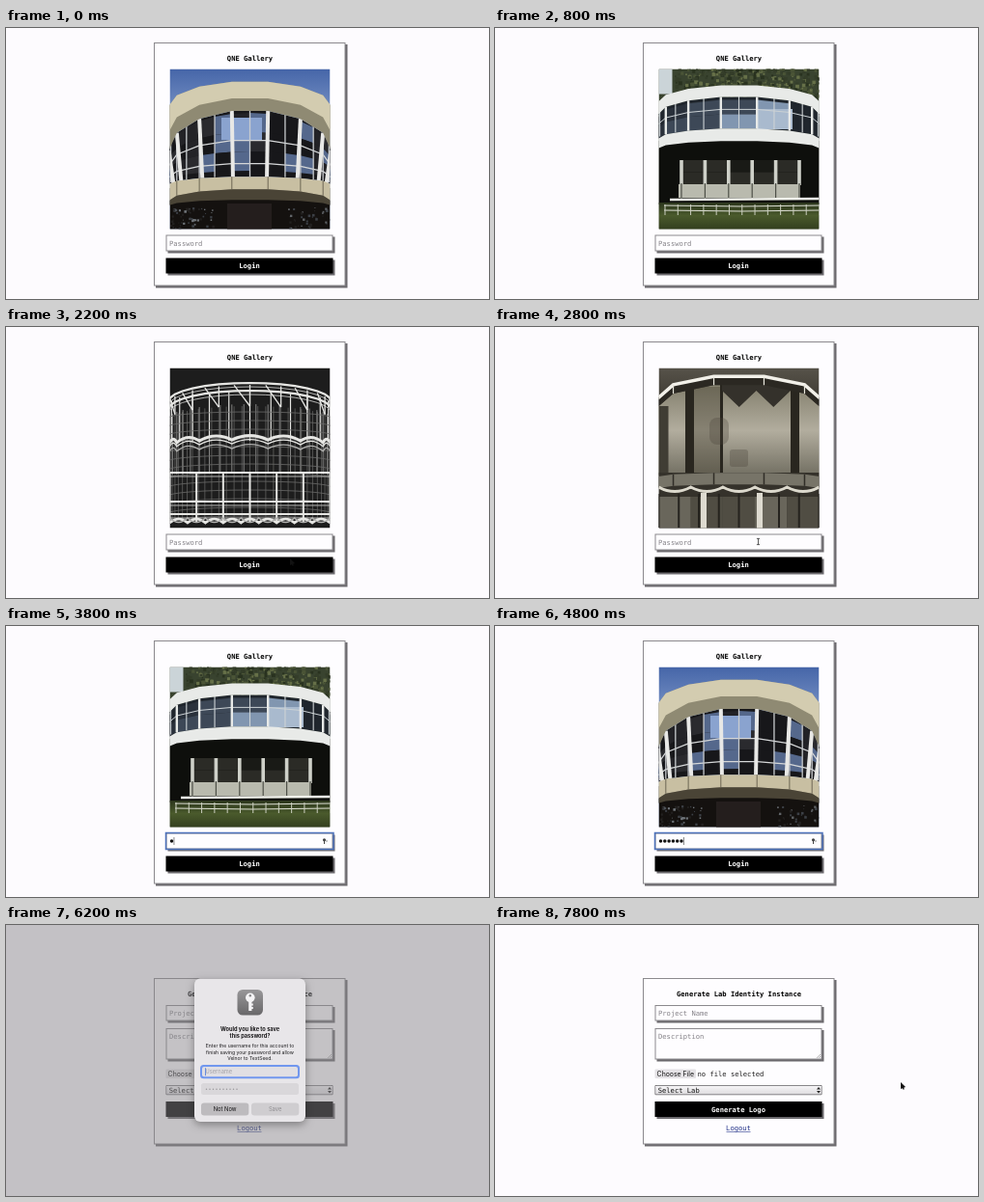
These frames come from a looping animation (500x281 px, 8000 ms). An HTML page with a canvas:

```html
<!DOCTYPE html>
<html lang="en">
<head>
<meta charset="utf-8">
<title>Login</title>
<style>
html, body { margin: 0; width: 100%; height: 100%; overflow: hidden; background: #fdfbfe; }
canvas { display: block; width: 500px; height: 281px; }
</style>
</head>
<body>
<canvas id="stage"></canvas>
<script>
const W = 500, H = 281, LOOP = 8000, TICK = 200;
const LEFT = 169.5, TOP = 42.5, SIZE = 166, CX = LEFT + SIZE / 2;
const MONO = '"DejaVu Sans Mono", monospace';
const SANS = 'Inter, sans-serif';
const canvas = document.getElementById('stage');
const ctx = canvas.getContext('2d');
const ratio = window.devicePixelRatio || 1;
canvas.width = W * ratio;
canvas.height = H * ratio;

const clamp = v => Math.max(0, Math.min(1, v));
const ease = v => v * v * (3 - 2 * v);
const span = (t, from, to) => ease(clamp((t - from) / (to - from)));
const mix = (a, b, k) => a + (b - a) * k;
const between = (p, q, k) => [mix(p[0], q[0], k), mix(p[1], q[1], k)];

function rect(x, y, w, h, color) {
  ctx.fillStyle = color;
  ctx.fillRect(x, y, w, h);
}
function round(x, y, w, h, r, color) {
  ctx.beginPath();
  ctx.roundRect(x, y, w, h, r);
  ctx.fillStyle = color;
  ctx.fill();
}
function dot(x, y, r, color) {
  ctx.beginPath();
  ctx.arc(x, y, r, 0, Math.PI * 2);
  ctx.fillStyle = color;
  ctx.fill();
}
function poly(pts, color) {
  ctx.beginPath();
  pts.forEach(p => ctx.lineTo(...p));
  ctx.fillStyle = color;
  ctx.fill();
}
function stroke(pts, color, width = 1) {
  ctx.beginPath();
  pts.forEach(p => ctx.lineTo(...p));
  ctx.strokeStyle = color;
  ctx.lineWidth = width;
  ctx.stroke();
}
function fade(y0, y1, ...colors) {
  const g = ctx.createLinearGradient(0, y0, 0, y1);
  colors.forEach((c, i) => g.addColorStop(i / (colors.length - 1), c));
  return g;
}
function text(str, x, y, font, color, align = 'left') {
  ctx.font = font;
  ctx.fillStyle = color;
  ctx.textAlign = align;
  ctx.fillText(str, x, y);
}
function seeded(seed) {
  return () => (seed = (seed * 16807) % 2147483647) / 2147483647;
}

// Rims of a round, faceted building: corners at equal angles, seen from below
function rim(y, sag, n, radius = SIZE / 2 + 1) {
  return Array.from({ length: n + 1 }, (_, i) => {
    const a = (i / n - 0.5) * Math.PI;
    return [CX + radius * Math.sin(a), y + sag * (1 - Math.cos(a))];
  });
}
// Straight or zigzag row of corners
function row(y, n, zig = 0, x0 = LEFT, x1 = LEFT + SIZE) {
  return Array.from({ length: n + 1 }, (_, i) => [mix(x0, x1, i / n), y + (i % 2) * zig]);
}
const band = (top, low, color) => poly([...top, ...[...low].reverse()], color);
const posts = (top, low, color, width) =>
  top.forEach((p, i) => stroke([p, low[i]], color, width));

// Grid of window panes between two rims
function panes(top, low, rows, colors, seed) {
  const rnd = seeded(seed);
  for (let i = 0; i + 1 < top.length; i++) {
    for (let r = 0; r < rows; r++) {
      const side = k => between(top[i + k], low[i + k], r / rows);
      const foot = k => between(top[i + k], low[i + k], (r + 1) / rows);
      poly([side(0), side(1), foot(1), foot(0)], colors[Math.floor(rnd() * colors.length)]);
    }
  }
}
function scallops(pts, lift, color, width) {
  ctx.beginPath();
  pts.forEach((p, i) => {
    if (!i) return ctx.moveTo(...p);
    const [mx, my] = between(pts[i - 1], p, 0.5);
    ctx.quadraticCurveTo(mx, my - lift, ...p);
  });
  ctx.strokeStyle = color;
  ctx.lineWidth = width;
  ctx.stroke();
}
function specks(seed, count, x, y, w, h, colors, size) {
  const rnd = seeded(seed);
  for (let i = 0; i < count; i++) {
    const s = size * (0.4 + rnd());
    rect(x + rnd() * w, y + rnd() * h, s, s, colors[i % colors.length]);
  }
}
const backdrop = color => rect(LEFT, TOP, SIZE, SIZE, color);

function dayView() {
  const n = 7, eave = rim(85, 42, n), sill = rim(154, 8, n), base = rim(167, 12, n);
  backdrop(fade(42, 110, '#4565a8', '#8fa7d2'));
  band(eave, sill, '#17171a');
  panes(rim(88, 40, 14), rim(148, 10, 14), 3, ['#17171a', '#232327', '#17171a', '#55688c', '#2a2a2e'], 71);
  rect(223, 93, 42, 23, '#8aa3cf');
  for (const k of [0.45, 0.8]) stroke(rim(mix(85, 154, k), mix(42, 8, k), n), '#d5d7d8', 1.3);
  posts(rim(85, 42, 14), rim(154, 8, 14), '#c9cccf', 1.3);
  posts(eave, rim(154, 8, n, 79), '#e8e8e6', 4);
  band(rim(55, 26, n), eave, '#8f8a73');
  band(rim(55, 26, n), rim(72, 36, n), '#d3ccb0');
  rect(LEFT, 166, SIZE, 43, '#14110f');
  band(base, rim(178, 6, n), '#4a4436');
  band(sill, base, '#c8bfa2');
  posts(sill, base, '#6d6654', 1);
  rect(229, 182, 46, 27, '#241e1d');
  specks(17, 60, LEFT, 186, 44, 22, ['#3c4046', '#22201f', '#70757a'], 2);
  specks(31, 40, 290, 186, 46, 22, ['#3c4046', '#22201f', '#606468'], 2);
}

function wireView() {
  const pale = '#e6e6e3', mid = '#b2b2b0', dim = '#6a6a69';
  const grid = (y0, y1, count, color, width) => posts(rim(y0, 14, count), rim(y1, 2, count), color, width);
  backdrop('#1d1d1d');
  grid(82, 200, 32, dim, 0.7);
  grid(80, 152, 21, mid, 0.7);
  grid(66, 118, 12, pale, 1.2);
  for (let y = 88; y < 200; y += 9) stroke(rim(y, 6, 16), dim, 0.8);
  for (let i = 0; i < 4; i++) stroke(rim(58 + i * 4, 19, 16), i % 2 ? mid : pale, i % 2 ? 1 : 2.2);
  // Roof struts meet in pairs
  const outer = rim(60, 19, 16), inner = rim(82, 14, 8);
  outer.forEach((p, i) => stroke([p, inner[Math.round(i / 2)]], pale, 1.3));
  for (const y of [117, 121, 126]) scallops(rim(y, 5, 7), 9, y < 125 ? pale : mid, y < 120 ? 3 : 1.3);
  for (const y of [151, 181, 194]) {
    stroke(row(y, 1), pale, 2.2);
    stroke(row(y + 4, 1), mid, 1);
  }
  posts(row(151, 6), row(202, 6), pale, 2);
  scallops(row(203, 9), 8, pale, 2.6);
  scallops(row(198, 9), -9, mid, 1.4);
}

function sepiaView() {
  const n = 5, top = rim(50, 24, n), wall = rim(59, 24, n), sill = rim(151, 4, n);
  backdrop(fade(42, 75, '#57534a', '#3f3b33'));
  band(wall, sill, fade(62, 153, '#85816f', '#b2ad9e', '#737063'));
  rect(LEFT, 82, 10, 72, '#403d34');
  for (const x of [197, 233, 306]) rect(x, 58, x === 233 ? 3 : 9, 94, '#29261f');
  rect(206, 62, 27, 90, 'rgba(70,66,52,.4)');
  // Shadow of the pleated ceiling
  band(row(60, 4, 0, 235, 306), row(66, 4, 17, 235, 306), '#34312b');
  round(222, 94, 20, 28, 8, 'rgba(69,64,53,.3)');
  round(243, 127, 19, 18, 3, 'rgba(69,64,53,.3)');
  band(top, wall, '#2b2822');
  stroke(top, '#f2f0e9', 3.5);
  posts(top, wall, '#e9e7dd', 1.2);
  rect(LEFT, 151, SIZE, 58, '#35322b');
  band(sill, rim(163, 4, n), '#777468');
  posts(sill, rim(163, 4, n), '#302d27', 1.5);
  panes(row(176, 5), row(208, 5), 1, ['#69665b', '#504d43'], 5);
  scallops(row(166, 5), -9, '#dcd9cd', 3);
  posts(row(173, 8), row(208, 8), '#25231e', 2);
  for (const x of [216, 274]) rect(x - 3, 172, 6, 37, '#dedbd0');
}

function gardenView() {
  const n = 7, eave = rim(71, 19, n), sill = rim(104, 11, n), white = '#e8eae8';
  backdrop('#39432f');
  specks(53, 420, 185, 40, 150, 34, ['#29321f', '#4a5436', '#667048', '#343d29'], 3);
  rect(LEFT, TOP, 14, 26, '#cbd4d8');
  band(eave, sill, '#20262d');
  panes(rim(74, 19, n), sill, 2, ['#20262d', '#3d4857', '#8196b0', '#2a313b'], 29);
  rect(271, 84, 37, 21, '#a9bace');
  stroke(rim(84, 16, n), '#cbd1d4', 1);
  posts(rim(71, 19, 14), rim(104, 11, 14), '#cdd3d5', 1.1);
  posts(eave, sill, white, 2.4);
  band(rim(59, 18, n), eave, white);
  rect(LEFT, 117, SIZE, 66, '#0e0f0c');
  band(sill, rim(117, 8, n), white);
  panes(row(137, 5, 0, 193, 315), row(162, 5, 0, 193, 315), 2, ['#2b2b26', '#191a16'], 11);
  posts(row(137, 5, 0, 193, 315), row(163, 5, 0, 193, 315), '#ced0c8', 3.6);
  rect(190, 162, 126, 14, '#b9baae');
  posts(row(161, 5, 0, 193, 315), row(177, 5, 0, 193, 315), '#4e5048', 1.2);
  stroke(row(178, 1, -1, 181), '#f1f2ec', 2.3);
  rect(LEFT, 181, SIZE, 28, fade(181, 208, '#2c361d', '#4a5a2c', '#34401f'));
  for (const y of [184, 189]) stroke(row(y, 2, 1, 175), '#dddfd4', 1.1);
  posts(row(183, 12, 0, 176), row(194, 12, 0, 176), '#cbcfbf', 1);
}

function oliveView() {
  const grain = ['#8b866f', '#12110a', '#4a462f', '#0d0c07', '#6b664f'];
  const hall = [169, 302], cream = '#dcd7bd', black = '#0a0906';
  backdrop('#2b2818');
  specks(91, 900, LEFT, 40, SIZE, 45, grain, 1.5);
  specks(43, 800, 284, 100, 52, 108, grain, 1.5);
  const top = row(73, 4, 5), low = row(83, 4, 5);
  band(low, row(106, 4), black);
  band(top, low, '#8d8767');
  band(top.slice(2), low.slice(2), cream);
  rect(LEFT, 104, 134, 104, '#17160e');
  rect(LEFT, 104, 30, 27, '#55503a');
  rect(198, 102, 94, 29, black);
  poly([[290, 105], [308, 120], [302, 131], [290, 129]], cream);
  panes(row(131, 7, 0, ...hall), row(160, 7, 0, ...hall), 2, ['#17160e', '#3b3828', '#8a846a'], 8);
  posts(row(131, 7, 0, ...hall), row(160, 7, 0, ...hall), cream, 2.4);
  band(row(159, 4, 3, ...hall), row(166, 4, 5, ...hall), cream);
  rect(LEFT, 171, 116, 37, black);
  const shop = [178, 284];
  posts(row(169, 6, 0, ...shop), row(205, 6, 0, ...shop), '#a49d80', 1.8);
  for (const y of [186, 204]) scallops(row(y, 3, 0, ...shop), -4, cream, 2.4);
  specks(13, 130, LEFT, 167, 115, 41, ['#6a654d', black], 1.2);
}

const VIEWS = [dayView, wireView, sepiaView, gardenView, oliveView];

// Each tick steps a fixed fraction of the way round the views
function picture(t) {
  const turn = Math.floor(t / TICK) * 0.6725 % 1;
  ctx.save();
  ctx.beginPath();
  ctx.rect(LEFT, TOP, SIZE, SIZE);
  ctx.clip();
  VIEWS[Math.floor(turn * VIEWS.length)]();
  ctx.restore();
}

function box(x, y, w, h, fill = '#fefdff', border = '#8b898d') {
  rect(x + 2, y + 2, w, h, '#6c6a6e');
  rect(x, y, w, h, border);
  rect(x + 1, y + 1, w - 2, h - 2, fill);
}
function mono(str, x, y, color = '#222', bold = false, align = 'left') {
  text(str, x, y, `${bold ? 'bold ' : ''}7.15px ${MONO}`, color, align);
}
function card(y, h, title) {
  box(153, y, 198.5, h);
  mono(title, 252.5, y + 19.2, '#000', true, 'center');
}
function field(label, y, h) {
  box(165.5, y, 173, h);
  mono(label, 169, y + 11, '#858388');
}
function button(label, y) {
  box(165.5, y, 173, 16, '#000', '#000');
  mono(label, 252, y + 10.6, '#fff', true, 'center');
}

function arrow(x, y) {
  stroke([[x + 1.6, y + 4], [x + 3.2, y + 7.6]], '#111', 1.3);
  poly([[x, y], [x, y + 7], [x + 5, y + 5]], '#111');
}
function beam(x, y) {
  rect(x - 0.4, y - 3, 0.8, 6, '#333');
  for (const s of [-1, 1]) rect(x - 1.6, y + s * 3.2 - 0.4, 3.2, 0.8, '#333');
}
const caret = (x, y, color) => rect(x, y, 0.7, 8, color);

function login(t) {
  card(15, 252.5, 'QNE Gallery');
  picture(t);

  const focused = t >= 3300;
  const count = Math.floor(10 * clamp((t - 3505) / 1950));
  field(count ? '' : 'Password', 214.5, 17);
  if (focused) {
    const grow = 5 * (1 - span(t, 3300, 3500));
    ctx.strokeStyle = '#4d72bb';
    ctx.lineWidth = 1.5;
    ctx.strokeRect(165.5 - grow, 214.5 - grow, 173.5 + 2 * grow, 17 + 2 * grow);
    dot(329.5, 221.8, 1.6, '#444');
    rect(329, 222, 1, 4, '#444');
    rect(331.6, 222, 0.8, 2, '#777');
    caret(169.3 + count * 4.3, 219, '#555');
  }
  for (let i = 0; i < count; i++) dot(171.5 + i * 4.3, 223, 1.75, '#111');
  button('Login', 238.5);

  if (t >= 2200 && t < 3700) {
    const k = span(t, 2200, 2700);
    const x = mix(294, 272.5, k), y = mix(240, 222.5, k);
    y > 232 ? arrow(x, y) : beam(x, y);
  }
}

function form() {
  card(55, 172.5, 'Generate Lab Identity Instance');
  field('Project Name', 83, 16.5);
  field('Description', 107, 32.5);
  for (const d of [2, 4]) stroke([[337 - d, 138], [337, 138 - d]], '#888', 0.6);
  round(165.5, 149.5, 42.5, 9.5, 1, '#e4e2e5');
  text('Choose File', 186.8, 156.8, `6.9px ${SANS}`, '#111', 'center');
  mono('no file selected', 209.5, 156.8);
  round(165.5, 166, 173, 10.3, 1, '#626064');
  round(166.2, 166.7, 171.6, 8.9, 0.6, fade(166, 176, '#f8f7f9', '#dddbde'));
  mono('Select Lab', 168.7, 173.5, '#111');
  for (const s of [-1, 1]) {
    const y = 171.2 + s * 0.8;
    poly([[333, y], [337, y], [335, y + s * 2.5]], '#222');
  }
  button('Generate Logo', 183);
  mono('Logout', 252, 213, '#25348a', false, 'center');
  rect(239.5, 214.2, 25, 0.6, '#25348a');
}

function dialog(t) {
  ctx.save();
  ctx.shadowColor = 'rgba(0,0,0,.35)';
  ctx.shadowBlur = 9 * ratio;
  ctx.shadowOffsetY = 3 * ratio;
  round(195, 55.5, 115, 148.5, 6, '#e8e6e9');
  ctx.restore();

  const pale = '#f4f3f5';
  round(239.5, 67, 26.5, 26.5, 5.5, fade(67, 93, '#989799', '#69686a'));
  dot(252.8, 75.3, 4.8, pale);
  dot(252.8, 73.3, 1.2, '#858486');
  rect(251.2, 78, 3.2, 11, pale);
  for (const y of [81.5, 85]) rect(253, y, 2.8, 2, pale);

  const lines = (list, y, step, font, color = '#1b1a1c') => list.forEach((str, i) =>
    text(str, 252.5, y + i * step, `${font} ${SANS}`, color, 'center'));
  lines(['Would you like to save', 'this password?'], 110.2, 7.1, 'bold 5.65px');
  lines(['Enter the username for this account to',
    'finish saving your password and allow', 'Velnor to TextSeed.'], 127.1, 6.5, '5.05px');

  round(201, 145, 103, 14.2, 3.5, '#7197ee');
  round(203, 147, 99, 10.2, 2, '#e1dfe3');
  text('Username', 206.5, 154.3, `5.7px ${SANS}`, '#a19fa5');
  if (t % 1000 < 600) caret(206, 148.2, '#3569d8');
  round(202, 164, 101, 12, 2.5, '#d9d7da');
  for (let i = 0; i < 10; i++) dot(207.5 + i * 3.5, 170.2, 0.75, '#99979b');

  const choice = (label, x, fill, color) => {
    round(x, 184.5, 49.3, 13, 3, fill);
    text(label, x + 24.6, 193.1, `5.8px ${SANS}`, color, 'center');
  };
  choice('Not Now', 202, '#bdbbbe', '#161517');
  choice('Save', 254, '#cfcdd0', '#8f8d91');
}

function draw(t) {
  ctx.setTransform(ratio, 0, 0, ratio, 0, 0);
  rect(0, 0, W, H, '#fdfbfe');
  if (t < 5900) return login(t);

  form();
  const shown = span(t, 5920, 6120) * (1 - span(t, 7300, 7480));
  if (shown > 0) {
    ctx.globalAlpha = shown;
    rect(0, 0, W, H, 'rgba(135,134,138,.49)');
    dialog(t);
    ctx.globalAlpha = 1;
  }
  if (t >= 6500) {
    const near = span(t, 6500, 7050), away = span(t, 7350, 7750);
    arrow(mix(mix(300, 227, near), 420, away), mix(mix(222, 190, near), 163, away));
  }
}

function play() {
  draw(performance.now() % LOOP);
  requestAnimationFrame(play);
}
play();
</script>
</body>
</html>
```
